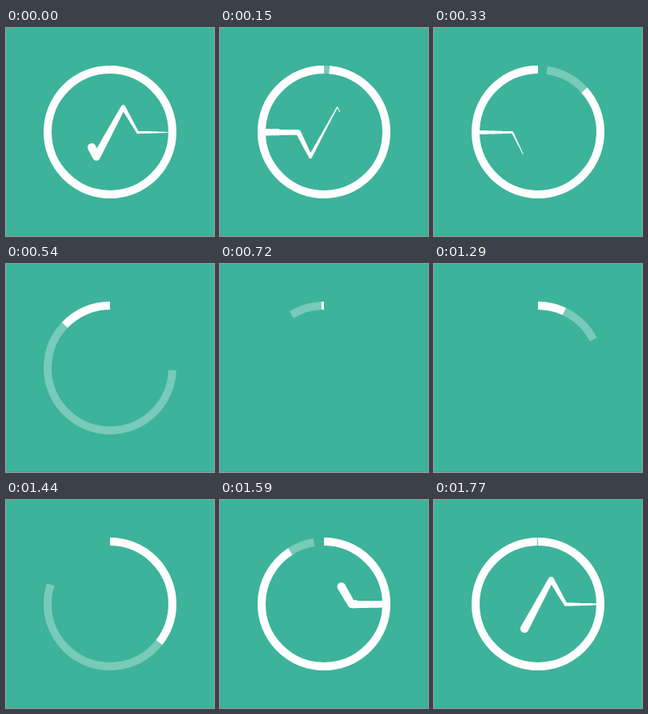
An HTML page with a canvas for the animation above (1800 ms loop, 260x260 px).

```html
<!DOCTYPE html>
<html>
<head>
<meta charset="utf-8">
<style>
  html, body { margin: 0; width: 100%; height: 100%; overflow: hidden; background: #3db39b; }
  canvas { display: block; }
</style>
</head>
<body>
<canvas id="stage" width="260" height="260"></canvas>
<script>
const ctx = document.getElementById('stage').getContext('2d');
const LOOP = 1800, SWEEP = 765, SPEED = .45;
const WHITE = '#fff', FAINT = 'rgba(255,255,255,.3)';

// The pulse runs from the right side of the ring to the left, drawing a tick on its way.
const path = [[204, 130.5], [164.5, 130.5], [146.5, 99], [113, 161], [98, 130.5], [56, 130.5]];

const lerp = (a, b, k) => a + (b - a) * k;
const clamp = (x, lo, hi) => Math.min(hi, Math.max(lo, x));

// cubic-bezier(.86, 0, .25, 1)
function ease(x) {
  if (x <= 0) return 0;
  if (x >= 1) return 1;
  let lo = 0, hi = 1;
  for (let i = 0; i < 30; i++) {
    const s = (lo + hi) / 2, r = 1 - s;
    if (2.58 * s * r * r + .75 * s * s * r + s * s * s < x) lo = s; else hi = s;
  }
  return lo * lo * (3 - 2 * lo);
}

function arc(from, to, color) {
  if (to - from < 1e-4) return;
  const angle = k => (k - .25) * 2 * Math.PI;
  ctx.strokeStyle = color;
  ctx.lineWidth = 10;
  ctx.beginPath();
  ctx.arc(130, 130, 78, angle(from), angle(to));
  ctx.stroke();
}

function ring(t) {
  const sweep = start => ease((t - start) / SWEEP);
  if (t < 950) {
    arc(sweep(179), 1, FAINT);
    arc(sweep(30), 1, WHITE);
  } else {
    arc(0, sweep(964), FAINT);
    arc(0, sweep(1052), WHITE);
  }
}

function pointAt(d) {
  for (let i = 1; i < path.length; i++) {
    const [x0, y0] = path[i - 1], [x1, y1] = path[i];
    const len = Math.hypot(x1 - x0, y1 - y0);
    if (d <= len) return [lerp(x0, x1, d / len), lerp(y0, y1, d / len)];
    d -= len;
  }
}

// A tapered stroke: head and tail travel at one speed and get thinner with time.
function pulse(t) {
  const head = SPEED * (t - 1446), tail = Math.max(0, SPEED * (t - 1797));
  const headWidth = Math.min(10.5, 11 - (t - LOOP) / 55);
  const tailWidth = clamp(8 - (t - 1590) / 30, 1, 8);
  const end = Math.min(head, 226);
  ctx.fillStyle = WHITE;
  ctx.beginPath();
  for (let d = tail; d <= end; d += .4) {
    const p = pointAt(d);
    if (!p) break;
    const [x, y] = p;
    const r = lerp(tailWidth, headWidth, (d - tail) / (end - tail || 1)) / 2;
    ctx.moveTo(x + r, y);
    ctx.arc(x, y, r, 0, 7);
  }
  ctx.fill();
}

function draw(t) {
  ctx.fillStyle = '#3db39b';
  ctx.fillRect(0, 0, 260, 260);
  ctx.fillStyle = '#39a892';
  ctx.fillRect(0, 259, 260, 1);
  // Both parts finish a little after the loop point.
  ring(t < 30 ? t + LOOP : t);
  pulse(t < 500 ? t + LOOP : t);
}

const start = performance.now();
function tick() {
  draw((performance.now() - start) % LOOP);
  requestAnimationFrame(tick);
}
tick();
</script>
</body>
</html>
```
